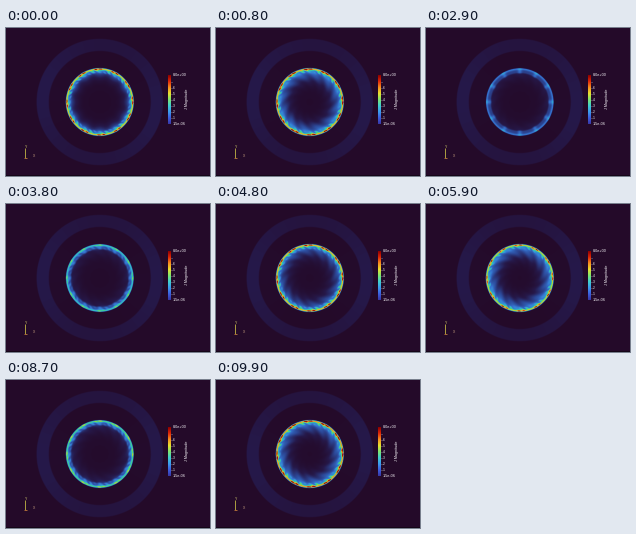
Recreate the animation shown at these times as a matplotlib script. Size 204 by 148 pixels, loop 10 s.

```python
import numpy as np
import matplotlib.pyplot as plt
from matplotlib.animation import FuncAnimation
from matplotlib.colors import LinearSegmentedColormap

W, H, DPI = 204, 148, 100
FRAMES, STEP = 100, 100
CX, CY, RIM = 93.8, 74.0, 34.0
TEETH = 12
PERIOD, PEAK = 4.7, 0.5
SS = 2  # supersampling

FIELD = LinearSegmentedColormap.from_list("field", [
    (0.00, "#240a29"), (0.10, "#26194a"), (0.22, "#2c4796"),
    (0.36, "#3678d4"), (0.50, "#30b8cc"), (0.62, "#48d67c"),
    (0.74, "#a8dc3c"), (0.85, "#ecb030"), (0.94, "#e05a1c"),
    (1.00, "#a01808")])
BAR = LinearSegmentedColormap.from_list("bar", [
    "#3838a8", "#3c60e0", "#3c9cf0", "#40d0d0", "#80e870",
    "#e8e030", "#f89020", "#e02808", "#900000"])

ys, xs = np.mgrid[0:H * SS, 0:W * SS]
dx = (xs + 0.5) / SS - CX
dy = CY - (ys + 0.5) / SS
r = np.hypot(dx, dy)
ang = np.arctan2(dy, dx)
depth = np.clip(RIM - r, 0, RIM)


def edge(d, soft=0.6):
    return np.clip(0.5 + d / (2 * soft), 0, 1)


def bump(x, mid, width):
    return np.exp(-((x - mid) / width) ** 2)


disk = edge(RIM - r)
yoke = edge(63.2 - r) * edge(r - 51)
gap = edge(51 - r) * edge(r - 35)
teeth = 0.5 + 0.5 * np.cos(TEETH * (ang - np.pi / 2))
bars = edge(RIM - r) * edge(r - 28.5, 1.2)


def wave(t, lag=0.0):
    return 0.5 + 0.5 * np.cos(2 * np.pi * (t - PEAK - lag) / PERIOD)


def ease(t):
    u = np.clip(t, 0, 1)
    return u * u * (3 - 2 * u)


def field(t):
    rim, fill, start = wave(t), wave(t, 0.4), ease(t / 1.1)
    fill = 0.28 + 0.72 * fill

    # conductors along the rim, parted by the teeth
    band = bars * (0.17 + 0.07 * rim + 0.13 * teeth ** 6)
    spots = 0.5 + 0.5 * np.cos(3 * TEETH * ang + 1.3 * depth)
    spots *= 0.55 + 0.45 * np.cos(TEETH * ang - 0.7 * depth)
    skin = bump(r, 33.0, 1.1) * (0.14 + 0.42 * rim)
    speck = bump(r, 31.6, 2.3) * np.clip(spots, 0, 1) * 0.40 * rim
    ring = band + skin + speck

    # currents diffusing inwards, dragged into curved arms
    twist = ang + 0.045 * depth * start - 0.10 * t * start
    arms = 0.5 + 0.5 * np.cos(TEETH * twist)
    reach = 7.5 + 3 * fill * start
    glow = np.exp(-(depth / reach) ** 2 / 1.5) * fill * (0.27 + 0.10 * arms)

    v = disk * (np.maximum(ring, glow) + 0.2 * np.minimum(ring, glow) + 0.015)

    # faint flux in the surrounding yoke
    lobe = np.cos(2 * (ang - np.radians(170) - 0.03 * t))
    v += yoke * (0.084 + 0.016 * lobe)
    v += gap * 0.006 * (1 + lobe)
    return np.clip(v, 0, 1)


def render(t):
    rgb = FIELD(field(t))[..., :3]
    rgb = rgb.reshape(H, SS, W, SS, 3).mean(axis=(1, 3))
    rgb[-1] *= 0.6
    return rgb


fig = plt.figure(figsize=(W / DPI, H / DPI), dpi=DPI, facecolor="#240a29")
ax = fig.add_axes([0, 0, 1, 1])
ax.axis("off")
picture = ax.imshow(render(0), extent=(0, W, H, 0), interpolation="nearest", aspect="auto")


def label(x, y, text, size=4.0, color="#f4f2f6", **kw):
    ax.text(x, y, text, fontsize=size * 72 / DPI, color=color,
            family="Liberation Sans", va="center", **kw)


def line(x, y, color, width=1.0):
    ax.plot(x, y, color=color, lw=width * 72 / DPI, solid_capstyle="butt")


# colour bar
ax.imshow(np.linspace(1, 0, 98)[:, None], cmap=BAR, extent=(162, 165, 96.5, 47.5),
          interpolation="bilinear", aspect="auto", zorder=2)
label(166.5, 47.5, "8.0e+00", 3.8)
for n in range(1, 8):
    y = 96 - 48 * n / 8
    line([165, 166], [y, y], "#b8b0c0", 0.6)
    if n < 7:
        label(167, y, str(n), 3.2)
label(166.5, 96, "1.5e-06", 3.8)
label(181, 71, "J Magnitude", 3.8, rotation=90, ha="center")

# orientation axes
line([18.5, 18.5], [120, 130], "#a89a40")
line([18, 21], [129.5, 129.5], "#a86838")
label(20, 119, "Y", 3.4, "#d8d070", ha="center")
label(28, 128, "X", 3.4, "#c8a080", ha="center")
ax.set_xlim(0, W)
ax.set_ylim(H, 0)


def update(i):
    picture.set_data(render(i * STEP / 1000))
    return [picture]


anim = FuncAnimation(fig, update, frames=FRAMES, interval=STEP,
                     repeat=True, repeat_delay=0, blit=False)
plt.show()
```
